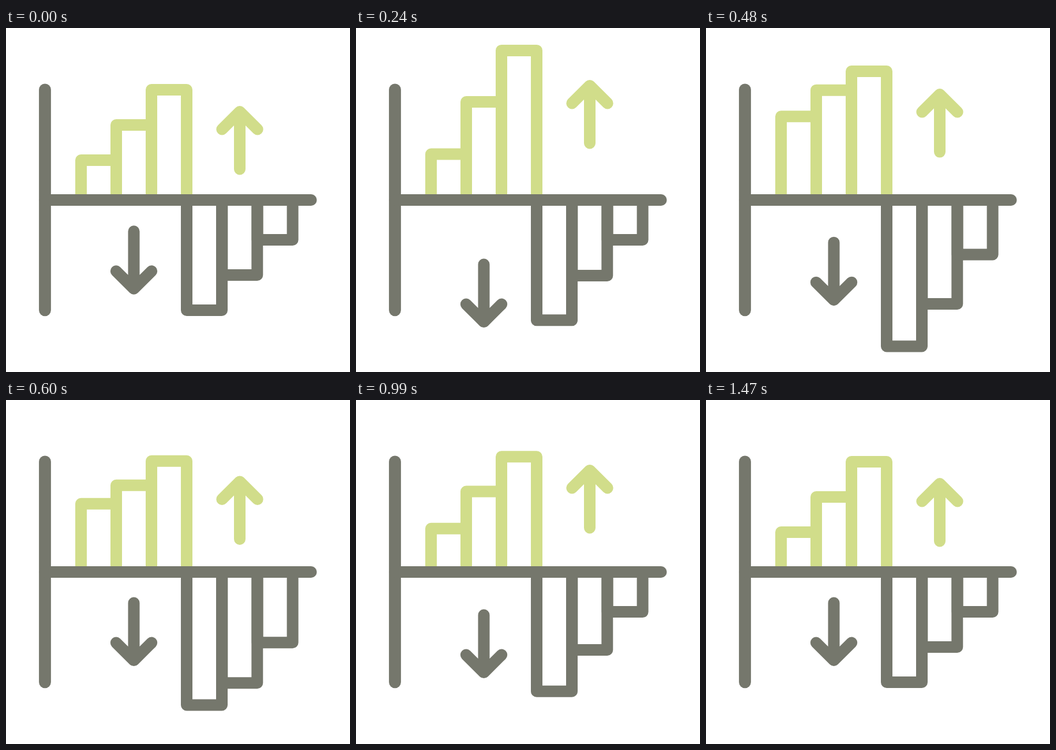
These frames come from a looping animation (596x596 px, 1.5 s). An HTML page:

```html
<!DOCTYPE html>
<html>
<head>
<meta charset="utf-8">
<style>
  html, body { margin: 0; width: 100%; height: 100%; overflow: hidden; background: #fff; }
  svg { display: block; width: 100vw; height: 100vh; }
  path { fill: none; stroke-width: 20; stroke-linecap: round; stroke-linejoin: round; }
  .up { stroke: #d1dd8a; }
  .down { stroke: #75776c; }
  .wall { stroke-width: 20.8; }
</style>
</head>
<body>
<svg viewBox="0 0 596 596">
  <g id="moving"></g>
  <path class="down wall" d="M67.5 106.8V488.8"/>
  <path class="down" d="M67.5 298H528.5"/>
</svg>
<script>
const LOOP = 1500, STEP = 30, AXIS = 298, BAR = 61;
const moving = document.getElementById('moving');
const parts = [];

function ease(from, to, t) {
  const p = Math.min(1, Math.max(0, (t - from) / (to - from)));
  return p * p * (3 - 2 * p);
}

// A large bump that rests at zero, then a small one.
const swing = (peak, rest, peak2, end) => (t, height, height2) =>
  height * (ease(0, peak, t) - ease(peak, rest, t)) +
  height2 * (ease(rest, peak2, t) - ease(peak2, end, t));

const quick = swing(300, 625, 905, 1195);
const slow = swing(375, 655, 945, 1150);

function addPart(kind, move, delay, height, height2, shape) {
  const path = document.createElementNS('http://www.w3.org/2000/svg', 'path');
  path.setAttribute('class', kind);
  moving.append(path);
  parts.push(t => path.setAttribute('d', shape(move(t - delay, height, height2))));
}

const bar = (x, y) => `M${x} ${AXIS}V${y}h${BAR}V${AXIS}`;

// dir is -1 for an arrow pointing up, 1 for down
const arrow = (x, tip, dir) =>
  `M${x} ${tip - 99.5 * dir}V${tip}M${x - 30.7} ${tip - 30.5 * dir}L${x} ${tip}l30.7 ${-30.5 * dir}`;

for (let i = 0; i < 3; i++) {
  addPart('up', quick, 85 * (2 - i), 76, 8 + 1.5 * i, y => bar(130 + BAR * i, 229 - BAR * i - y));
  addPart('down', slow, 110 + 103 * i, 62.5, 18 - 5 * i, y => bar(313 + 61.3 * i, 489 - BAR * i + y));
}
addPart('up', quick, 25, 56, 26, y => arrow(405, 145 - y, -1));
addPart('down', quick, -20, 61, 30, y => arrow(221.5, 451 + y, 1));

function tick() {
  const t = Math.floor(performance.now() % LOOP / STEP) * STEP;
  for (const draw of parts) draw(t);
  requestAnimationFrame(tick);
}
tick();
</script>
</body>
</html>
```
